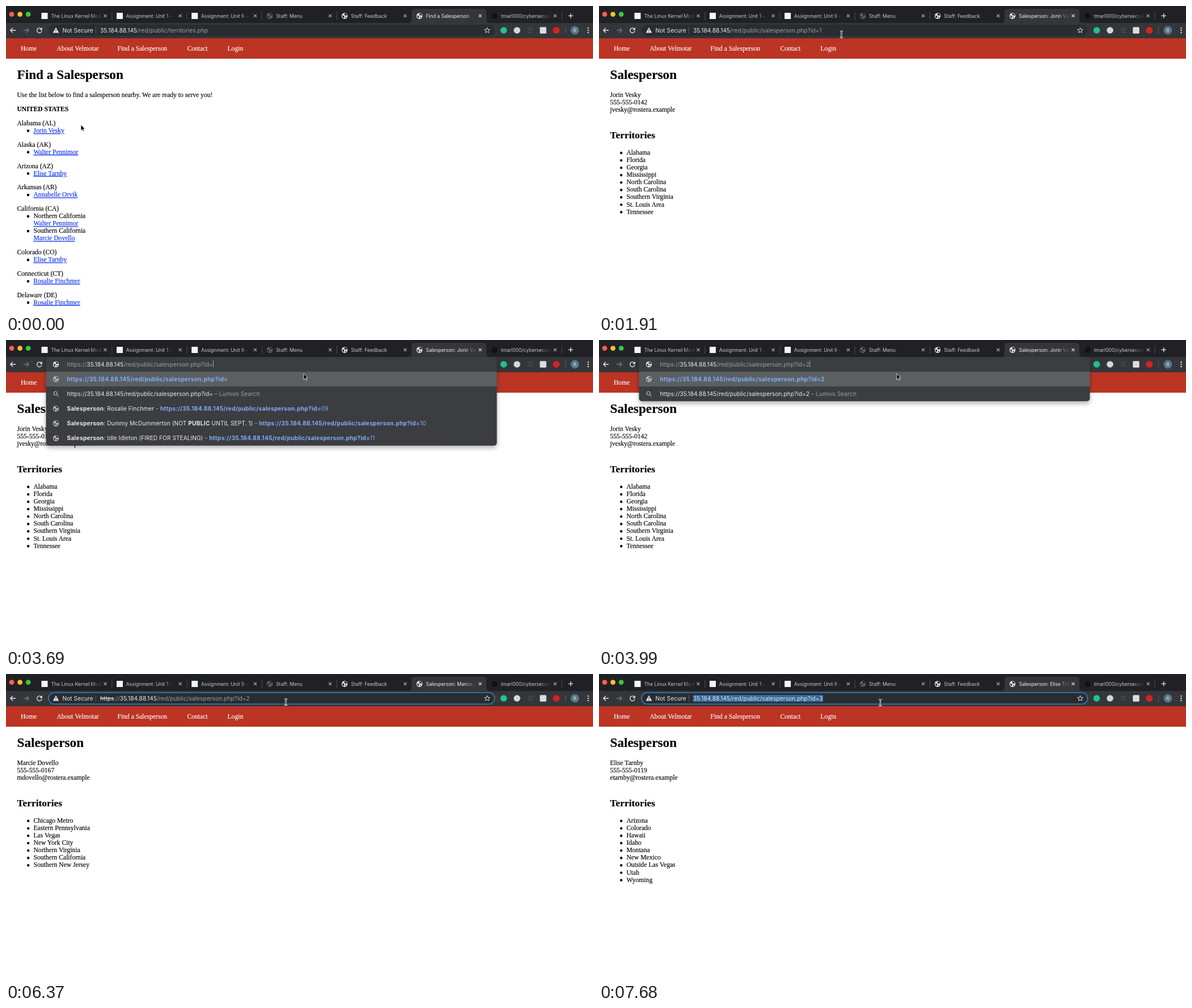
Animation, 1035 px wide and 541 px high, one loop 8000 ms. Source, as an HTML page:

```html
<!DOCTYPE html>
<html lang="en">
<head>
<meta charset="utf-8">
<title>Find a Salesperson</title>
<style>
  html, body { margin: 0; width: 100%; height: 100%; overflow: hidden; background: #fff; }
  #stage { display: block; width: 1035px; height: 541px; }
  text { white-space: pre; }
  .page { font: 11.6px "Liberation Serif", "Times New Roman", serif; color: #000; }
  .page text { fill: currentColor; stroke: currentColor; stroke-width: .15px; }
  .page .nav { color: #fff; }
  .page .h1 { font-size: 23.25px; font-weight: 700; }
  .page .h2 { font-size: 17.4px; font-weight: 700; }
  .page .b { font-weight: 700; }
  .page .link { color: #0a2fee; text-decoration: underline; }
  .ui { font: 10.17px Inter, Roboto, sans-serif; letter-spacing: .045px; fill: #e8eaed; }
  .ui .dim { fill: #9aa0a6; }
  .ui .bold { font-weight: 700; letter-spacing: .27px; }
  .ui .blue { fill: #7fadf7; }
  .ui .cut { text-decoration: line-through; }
  .tab { font: 8.65px Inter, Roboto, sans-serif; letter-spacing: -.05px; fill: #c3c6ca; }
  .tab.on { fill: #eceef0; }
  .line { fill: none; stroke-width: 1.3; stroke: #e8eaed; }
</style>
</head>
<body>
<svg id="stage" viewBox="0 0 1035 541" xmlns="http://www.w3.org/2000/svg">
  <defs>
    <linearGradient id="fadeOff"><stop stop-color="#202124" stop-opacity="0"/><stop offset="1" stop-color="#202124"/></linearGradient>
    <linearGradient id="fadeOn"><stop stop-color="#35363a" stop-opacity="0"/><stop offset="1" stop-color="#35363a"/></linearGradient>
    <filter id="shadow" x="-5%" y="-20%" width="110%" height="150%">
      <feDropShadow dx="0" dy="4" stdDeviation="4" flood-color="#000" flood-opacity=".3"/>
    </filter>
  </defs>
  <g id="page" class="page"></g>
  <g id="chrome"></g>
  <g id="tab"></g>
  <g id="bar" class="ui"></g>
  <g id="cursor"></g>
</svg>
<script>
const DURATION = 8000, LINE = 13.08, GAP = 11.63;
const HOST = '35.184.88.145', DIR = '/red/public/', ID = 'salesperson.php?id=';
const POPUP = '#3b3e41', PICKED = '#5b5f62';
const $ = id => document.getElementById(id);

const text = (x, y, s, cls = '') => `<text x="${x}" y="${y}" class="${cls}">${s}</text>`;
const span = (s, cls = '') => `<tspan class="${cls}">${s}</tspan>`;
const rect = (x, y, w, h, fill, more = '') => `<rect x="${x}" y="${y}" width="${w}" height="${h}" fill="${fill}" ${more}/>`;
const dot = (x, y, r, fill) => `<circle cx="${x}" cy="${y}" r="${r}" fill="${fill}"/>`;
const path = (d, more = 'class="line"') => `<path d="${d}" ${more}/>`;

const globe = (x, y, fill, land) => `<g transform="translate(${x} ${y})">` + dot(0, 0, 5.2, fill) +
  path('M-4.2-1.2Q-1.6-.8-.6.6T-1 2.2L-1.6 4.2Q-4.2 2.6-4.2-1.2ZM-.8-4.2Q.4-2.6-.6-1.6L1.4-.6Q3.2-1 4.2.2 4.4-3.2 1.6-4.2ZM1 1.4L3.4 1.8Q2.6 3.8.8 4Z', `fill="${land}"`) + '</g>';

// Page content
const directory = [
  ['Alabama (AL)', 'Jorin Vesky'], ['Alaska (AK)', 'Walter Pennimor'],
  ['Arizona (AZ)', 'Elise Tarnby'], ['Arkansas (AR)', 'Annabelle Orvik'],
  ['California (CA)', 'Northern California/Walter Pennimor', 'Southern California/Marcie Dovello'],
  ['Colorado (CO)', 'Elise Tarnby'], ['Connecticut (CT)', 'Rosalie Finchmer'],
  ['Delaware (DE)', 'Rosalie Finchmer']
];
const people = {
  1: ['Jorin Vesky', '555-555-0142', 'jvesky@rostera.example',
    'Alabama,Florida,Georgia,Mississippi,North Carolina,South Carolina,Southern Virginia,St. Louis Area,Tennessee'],
  2: ['Marcie Dovello', '555-555-0167', 'mdovello@rostera.example',
    'Chicago Metro,Eastern Pennsylvania,Las Vegas,New York City,Northern Virginia,Southern California,Southern New Jersey'],
  3: ['Elise Tarnby', '555-555-0119', 'etarnby@rostera.example',
    'Arizona,Colorado,Hawaii,Idaho,Montana,New Mexico,Outside Las Vegas,Utah,Wyoming']
};

function listPage() {
  let y = 211;
  let out = text(19.5, 129, 'Find a Salesperson', 'h1') +
    text(19.5, 161, 'Use the list below to find a salesperson nearby. We are ready to serve you!') +
    text(19.5, 186, 'UNITED STATES', 'b');
  for (const [state, ...entries] of directory) {
    out += text(19.5, y, state);
    for (const entry of entries) {
      out += rect(37, y + LINE - 5.4, 4, 4, '#000');
      const parts = entry.split('/');
      parts.forEach((s, i) => {
        y += LINE;
        out += text(48.5, y, s, i === parts.length - 1 ? 'link' : '');
      });
    }
    y += LINE + GAP;
  }
  return out;
}

function personPage(id) {
  const [name, phone, mail, areas] = people[id];
  return text(19.5, 129, 'Salesperson', 'h1') +
    [name, phone, mail].map((s, i) => text(19.5, 161 + i * LINE, s)).join('') +
    text(19.5, 234, 'Territories', 'h2') +
    areas.split(',').map((s, i) => dot(39.2, 259.8 + i * LINE, 2.2, '#000') + text(48.5, 263 + i * LINE, s)).join('');
}

function pageView(id) {
  const nav = [[26, 'Home'], [89.5, 'About Velmotar'], [196.5, 'Find a Salesperson'], [319.5, 'Contact'], [390.5, 'Login']];
  return rect(0, 56, 1035, 37.2, '#bb3424') + nav.map(([x, s]) => text(x, 79, s, 'nav')).join('') +
    (id ? personPage(id) : listPage());
}

// Browser frame
const TAB_W = 132.2;
function tabTitle(i, s, on) {
  const x = 79.5 + i * TAB_W;
  return `<svg x="${x}" y="8" width="87" height="18">${text(0, 12.6, s, on ? 'tab on' : 'tab')}` +
    rect(70, 0, 17, 18, `url(#fade${on ? 'On' : 'Off'})`) + '</svg>';
}
function closeMark(i, on) {
  const x = 175 + i * TAB_W;
  return path(`M${x - 2.5} 14.8l5 5m0-5l-5 5`, `fill="none" stroke="${on ? '#e8eaed' : '#b4b8bc'}" stroke-width="1.1"`);
}

function frameView() {
  const titles = ['The Linux Kernel Module Programming', 'Assignment: Unit 1 - ', 'Assignment: Unit 9 - ',
    'Staff: Menu', 'Staff: Feedback', '', 'tmarl000/cybersecurity'];
  const square = x => rect(x - 5.5, 12, 11, 11, '#f3f6f8');
  let out = rect(0, 0, 1035, 56.7, '#202124') + rect(0, 30, 1035, 26.7, '#35363a') +
    path('M709 30Q715 30 715 24V11Q715 5 721 5H841Q847 5 847 11V24Q847 30 853 30Z', 'fill="#35363a"') +
    dot(10, 14.7, 4.4, '#f95f57') + dot(24.6, 14.7, 4.4, '#f9bd2f') + dot(39.2, 14.7, 4.4, '#3cc546');
  titles.forEach((s, i) => { out += (s ? tabTitle(i, s) : '') + closeMark(i, i === 5); });
  for (const i of [0, 1, 2, 3, 6]) out += rect(186.3 + i * TAB_W, 10.5, 1, 14, '#4b4e52');
  out += square(68) + square(200.5) + square(332.7) + globe(465, 17.5, '#686c70', '#202124') +
    globe(597, 17.5, '#f1f3f4', '#202124') + globe(729, 17.5, '#f1f3f4', '#35363a') +
    dot(861.5, 17.5, 5.2, '#101214') + path('M991.5 17.3h8.4M995.7 13.1v8.4');

  out += path('M17 43H8M12 38.8L7.8 43l4.2 4.2') +
    path('M31 43h9M36 38.8l4.2 4.2-4.2 4.2', 'class="line" style="stroke:#75797d"') +
    path('M62.4 40.6A4.3 4.3 0 1 0 63.2 44') + path('M63.8 38v4.4h-4.4z', 'fill="#e8eaed"');
  out += dot(877.5, 43, 5.8, '#1fc28f') + dot(901, 43, 5.8, '#d4d6d8') +
    path('M920.5 39.5h8M920.5 43h8M920.5 46.5h8', 'stroke="#54575b"') +
    rect(941.3, 37.3, 11.4, 11.4, '#dcdddd', 'rx="1.5"') + dot(970.3, 43, 6, '#d2251f') +
    rect(986, 37, 1, 12, '#5a5d61') + dot(1003, 43, 7.4, '#55798a') +
    `<text x="1003" y="46" text-anchor="middle" class="ui" style="font-size:8px">R</text>`;
  for (const y of [39, 43, 47]) out += dot(1026.5, y, 1.2, '#e8eaed');
  return out;
}

// Address bar
const fullUrl = tail => 'https://' + HOST + DIR + tail;

function popup(tail, rows) {
  const top = 56, h = 26.15, width = 795;
  const url = fullUrl(tail), dash = span(' – ', 'dim');
  const visit = (who, n) => span('Salesperson', 'bold') + who + dash + span(url, 'bold blue') + span(n, 'blue');
  const items = [
    span(url, 'bold blue'),
    url + span(' – Lumivo Search', 'dim'),
    visit(': Rosalie Finchmer', '09'),
    visit(`: Dummy McDummerton (NOT ${span('PUBLIC', 'bold')} UNTIL SEPT. 1)`, 10),
    visit(': Idle Idleton (FIRED FOR STEALING)', 11)
  ];
  let out = rect(70.5, 30, width, 26 + h * rows, POPUP, 'rx="5" filter="url(#shadow)"') +
    rect(70.5, top, width, h, PICKED) + globe(88, 43, '#e8eaed', POPUP);
  out += `<text x="107.5" y="46.6">${span('https://', 'dim')}${HOST}${span(DIR + tail, 'dim')}` +
    `<tspan dx="-1" dy="-.5" font-weight="300">|</tspan></text>`;
  items.slice(0, rows).forEach((s, i) => {
    const y = top + h * (i + .5);
    out += i === 1
      ? path(`M90 ${y + 1.8}l2.6 2.6M90.2 ${y - 1}a3 3 0 1 1-6 0a3 3 0 1 1 6 0`, 'fill="none" stroke="#bdc1c6" stroke-width="1.1"')
      : globe(88, y, '#bdc1c6', i ? POPUP : PICKED);
    out += text(107.5, y + 3.6, s);
  });
  return out;
}

function barView(mode, tail, rows) {
  if (mode === 'edit') return popup(tail, rows);
  const ring = mode === 'plain' ? '' : 'stroke="#2f76a8" stroke-width="1.8"';
  const star = Array.from({ length: 10 }, (_, i) => {
    const r = i % 2 ? 2.2 : 5, a = i * Math.PI / 5;
    return (848.5 + r * Math.sin(a)).toFixed(1) + ' ' + (43.2 - r * Math.cos(a)).toFixed(1);
  }).join('L');
  let out = rect(75, 32.9, 786.5, 20.2, '#292c30', `rx="10.1" ${ring}`) +
    path('M88 37.8L93.3 47.6H82.7Z', 'fill="#e8eaed"') + path('M88 41v3.2M88 45.2v1.2', 'stroke="#292c30" stroke-width="1.1"') +
    text(99.5, 46.6, 'Not Secure') + rect(157.8, 37, 1, 12, '#5a5d61') +
    path(`M${star}Z`, 'fill="none" stroke="#dfe1e5"');
  const scheme = mode === 'https' ? span('https', 'cut') + span('://', 'dim') : '';
  if (mode === 'select') out += rect(165.8, 37, 229.4, 12.4, '#35659b');
  return out + text(166, 46.6, scheme + HOST + span(DIR + tail, mode === 'select' ? '' : 'dim'));
}

// Pointer
const BEAM = 'M-2.6-5.5Q0-5.4 0-4Q0-5.4 2.6-5.5M0-4V4M-2.6 5.5Q0 5.4 0 4Q0 5.4 2.6 5.5M-1.4 2h2.8';
const shapes = {
  arrow: path('M0 0V10.4L2.4 8.2 4 11.8 5.7 11.1 4.2 7.6H7.4Z', 'fill="#000" stroke="#fff" stroke-width=".8"'),
  hand: path('M-1 6.3V1.2a1 1 0 0 1 2 0V4.6l4.4.9q1.5.4 1.3 1.8l-.5 2.6-.9 2.4H.4L-3 8.4Q-3.8 7-2.6 6.8Z', 'fill="#fff" stroke="#000" stroke-width=".8"'),
  beam: path(BEAM, 'fill="none" stroke="#fff" stroke-width="2.2"') + path(BEAM, 'fill="none" stroke="#222" stroke-width=".8"')
};

// time, page, bar mode, address tail, popup rows
const views = [
  [0, 0, 'plain', 'territories.php'],
  [590, 0, 'plain', ID + 1],
  [740, 1, 'plain', ID + 1],
  [2060, 1, 'focus', ID + 1],
  [2200, 1, 'select', ID + 1],
  [2500, 1, 'https', ID + 1],
  [3550, 1, 'edit', ID, 2],
  [3690, 1, 'edit', ID, 5],
  [3840, 1, 'edit', ID + 2, 2],
  [4130, 1, 'plain', ID + 2],
  [4280, 2, 'plain', ID + 2],
  [5020, 2, 'focus', ID + 2],
  [5170, 2, 'select', ID + 2],
  [5920, 2, 'https', ID + 2],
  [6520, 2, 'edit', ID, 5],
  [6660, 2, 'edit', ID + 3, 2],
  [6960, 2, 'plain', ID + 3],
  [7100, 3, 'plain', ID + 3],
  [7540, 3, 'focus', ID + 3],
  [7680, 3, 'select', ID + 3]
];
// time, shape, x, y
const moves = [
  [0, 'arrow', 132, 210], [140, 'hand', 98, 220], [290, 'hand', 80, 223],
  [880, 'arrow', 170, 215], [1030, 'arrow', 345, 192], [1320, 'arrow', 400, 150],
  [1470, 'arrow', 424, 112], [1620, 'arrow', 428, 80], [1760, 'arrow', 428, 60],
  [1910, 'beam', 427.5, 50], [2950, 'beam', 475, 43], [3100, 'arrow', 524.7, 59.5],
  [4280, 'beam', 510, 52], [4430, 'beam', 495, 49], [4580, 'beam', 490.5, 48.5],
  [5170, 'beam', 493.5, 49.5], [6520, 'arrow', 493, 48.5], [6960, 'beam', 493.5, 49.5],
  [7390, 'beam', 495, 50], [7680, 'beam', 496, 50.5]
];

const at = (table, t) => table.findLast(row => row[0] <= t);
let view, move;

function draw(t) {
  const v = at(views, t), m = at(moves, t);
  if (v !== view) {
    const [, page, mode, tail, rows] = view = v;
    $('page').innerHTML = pageView(page);
    $('tab').innerHTML = tabTitle(5, page ? 'Salesperson: ' + people[page][0] : 'Find a Salesperson', true);
    $('bar').innerHTML = barView(mode, tail, rows);
  }
  if (m !== move) {
    const [, shape, x, y] = move = m;
    $('cursor').innerHTML = `<g transform="translate(${x} ${y})">${shapes[shape]}</g>`;
  }
}

$('chrome').innerHTML = frameView();
const start = performance.now();
function tick() {
  draw((performance.now() - start) % DURATION);
  requestAnimationFrame(tick);
}
tick();
</script>
</body>
</html>
```
